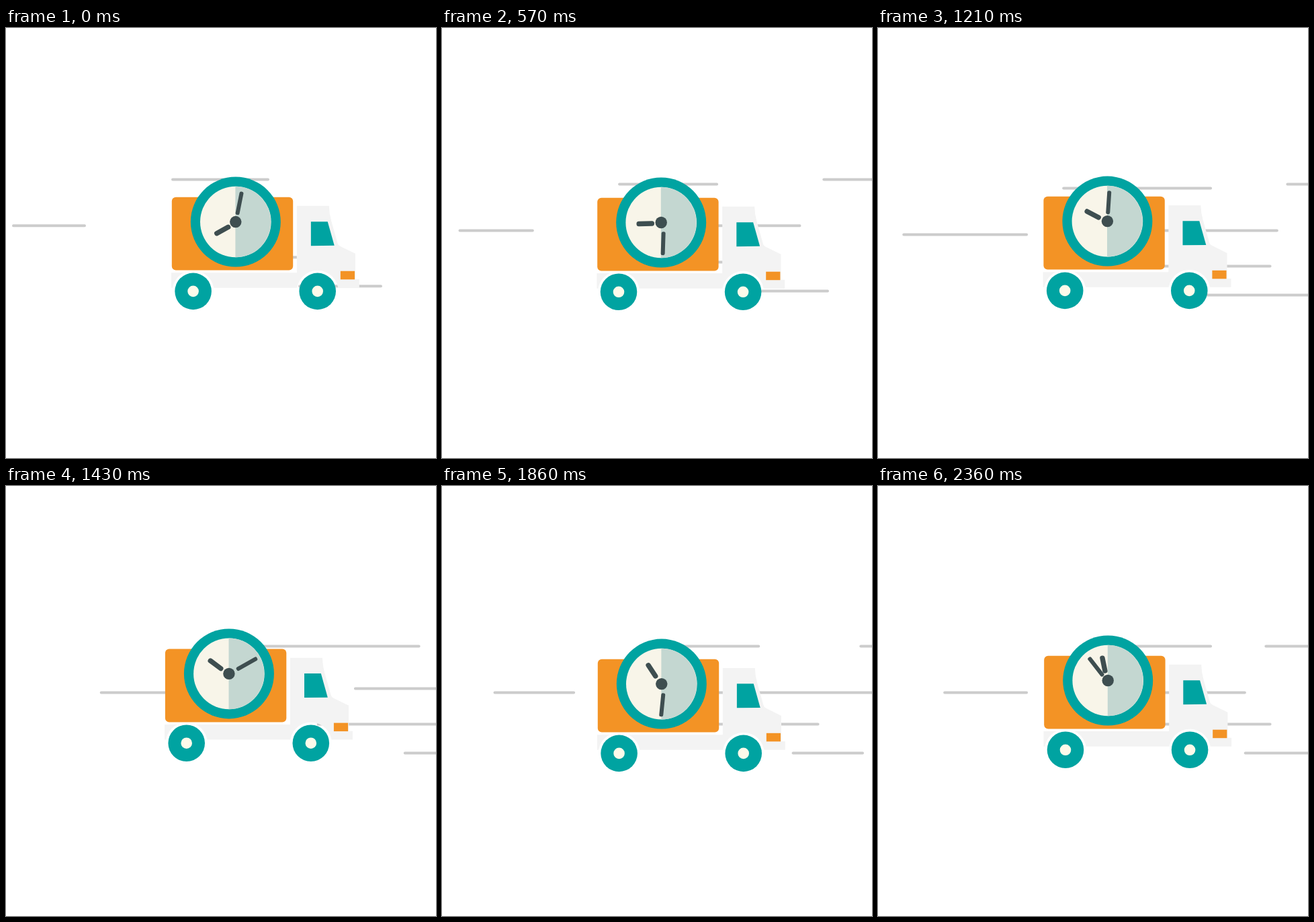
Recreate the animation shown at these times as an HTML page. Size 640 px wide and 640 px high, loop 2430 ms.

```html
<!DOCTYPE html>
<html lang="en">
<head>
<meta charset="utf-8">
<title>Express delivery</title>
<style>
  html, body { margin: 0; width: 100%; height: 100%; overflow: hidden; background: #fff; }
  svg { display: block; width: 100vw; height: 100vh; }
  .teal { fill: #00a3a1; }
  .orange { fill: #f39325; }
  .pale { fill: #f3f3f3; }
  .cream { fill: #f8f5e9; }
  .dark { fill: #3e4e50; }
  #streaks { fill: none; stroke: #ccc; stroke-width: 4; stroke-linecap: round; }
</style>
</head>
<body>
<svg viewBox="0 0 640 640">
  <defs>
    <mask id="arches" maskUnits="userSpaceOnUse" x="0" y="0" width="640" height="640">
      <rect width="640" height="640" fill="#fff"/>
      <circle cx="278.6" cy="392.3" r="31"/>
      <circle cx="463.7" cy="392.3" r="31"/>
    </mask>
  </defs>
  <path id="streaks"/>
  <g id="truck">
    <path class="pale" mask="url(#arches)" d="M246 364.6H432.8V265.3H480.8Q481 276 484 287L493 319Q494 323.500 497 325L520 336.300V374.300H525.800V387.200H246Z"/>
    <path class="teal" d="M453.900 288.700H478.700L488.700 324.300L453.900 324.700Z"/>
    <rect class="orange" x="497.800" y="362.200" width="21.200" height="12.500"/>
    <rect class="orange" x="246.800" y="252.200" width="180.400" height="108.800" rx="6"/>
    <circle class="teal" cx="278.600" cy="392.300" r="27.300"/>
    <circle class="teal" cx="463.700" cy="392.300" r="27.300"/>
    <circle cx="278.600" cy="392.300" r="8.300" fill="#fdfaea"/>
    <circle cx="463.700" cy="392.300" r="8.300" fill="#fdfaea"/>
    <circle class="teal" cx="341.800" cy="289" r="67"/>
    <circle class="cream" cx="341.800" cy="289" r="52.800"/>
    <path d="M341.400 236.200A52.800 52.800 0 0 1 341.400 341.800Z" fill="#c4d7d1"/>
    <rect id="minute" class="dark" x="-5" y="-47" width="6" height="35" rx="2.500"/>
    <rect id="hour" class="dark" x="-5.700" y="-37.300" width="7.400" height="26.600" rx="3.600"/>
    <circle class="dark" cx="341.800" cy="289" r="8.700"/>
  </g>
</svg>
<script>
const LOOP = 2430, STEPS_PER_SEC = 14, FPS = 25;
const el = id => document.getElementById(id);
const truck = el('truck'), minute = el('minute'), hour = el('hour'), streaks = el('streaks');

// Swaying path of the clock centre: [tick, x, y]
const sway = [
  [-1, 342.2, 289.5], [1, 341.4, 287.6], [4, 335.5, 281.5], [8, 328.3, 277.3],
  [11, 326.7, 279], [13, 326.2, 284], [15, 326.2, 289.5], [17, 326.8, 294.6],
  [19.5, 328, 296.8], [22, 330.8, 296.6], [25.5, 337.5, 293], [29, 342.2, 289.5]
];

// Streak rows: y, then [start, speed, acceleration] of the left and right end
const rows = [
  [225.4, [246, 20, 0.09], [392, 23.9, 0]],
  [294.3, [9, 19.2, 0.19], [119, 22, 0.38]],
  [341.2, [331, 20.3, 0.04], [480, 24, 0]],
  [384.3, [435, 25.9, -0.22], [560, 20, 0]]
];

// Waves of streaks: [delay in ticks, vertical shift]
const waves = [[0, 0], [14.2, 7.2], [26.6, 13.2], [29.6, 13.2], [43.6, 13.2], [54.6, 13.2]];

const travel = ([x, v, a], q) => x + v * q + a * q * q;

function swayAt(tick) {
  const k = tick % 30 === 29 ? -1 : tick % 30;
  const n = sway.findIndex(p => p[0] > k);
  const a = sway[n - 1], b = sway[n], u = (k - a[0]) / (b[0] - a[0]);
  return [a[1] + (b[1] - a[1]) * u, a[2] + (b[2] - a[2]) * u];
}

function streakPath(tick) {
  let d = '';
  for (const [delay, shift] of waves) {
    const q = tick - delay;
    if (q < -6) continue;
    for (const [y, left, right] of rows) {
      const x1 = travel(left, q) + 2, x2 = travel(right, q) - 2;
      if (x1 < 644 && x2 > x1) d += `M${x1.toFixed(2)} ${(y + shift).toFixed(1)}H${x2.toFixed(2)}`;
    }
  }
  return d;
}

function tickAt(ms) {
  let step = Math.floor(ms * STEPS_PER_SEC / 1000) + 1;
  while (Math.round(step * 100 / STEPS_PER_SEC) * 10 > ms) step--;
  return Math.floor(step * FPS / STEPS_PER_SEC + 0.9);
}

function draw(tick) {
  const [x, y] = swayAt(tick);
  truck.setAttribute('transform', `translate(${x - 341.8} ${y - 289})`);
  minute.setAttribute('transform', `translate(343.7 290.6) rotate(${11.3 + 11.37 * tick})`);
  hour.setAttribute('transform', `translate(342.3 288.2) rotate(${241.4 + 1.814 * tick})`);
  streaks.setAttribute('d', streakPath(tick));
}

const begin = performance.now();
function loop() {
  draw(tickAt((performance.now() - begin) % LOOP));
  requestAnimationFrame(loop);
}
loop();
</script>
</body>
</html>
```
